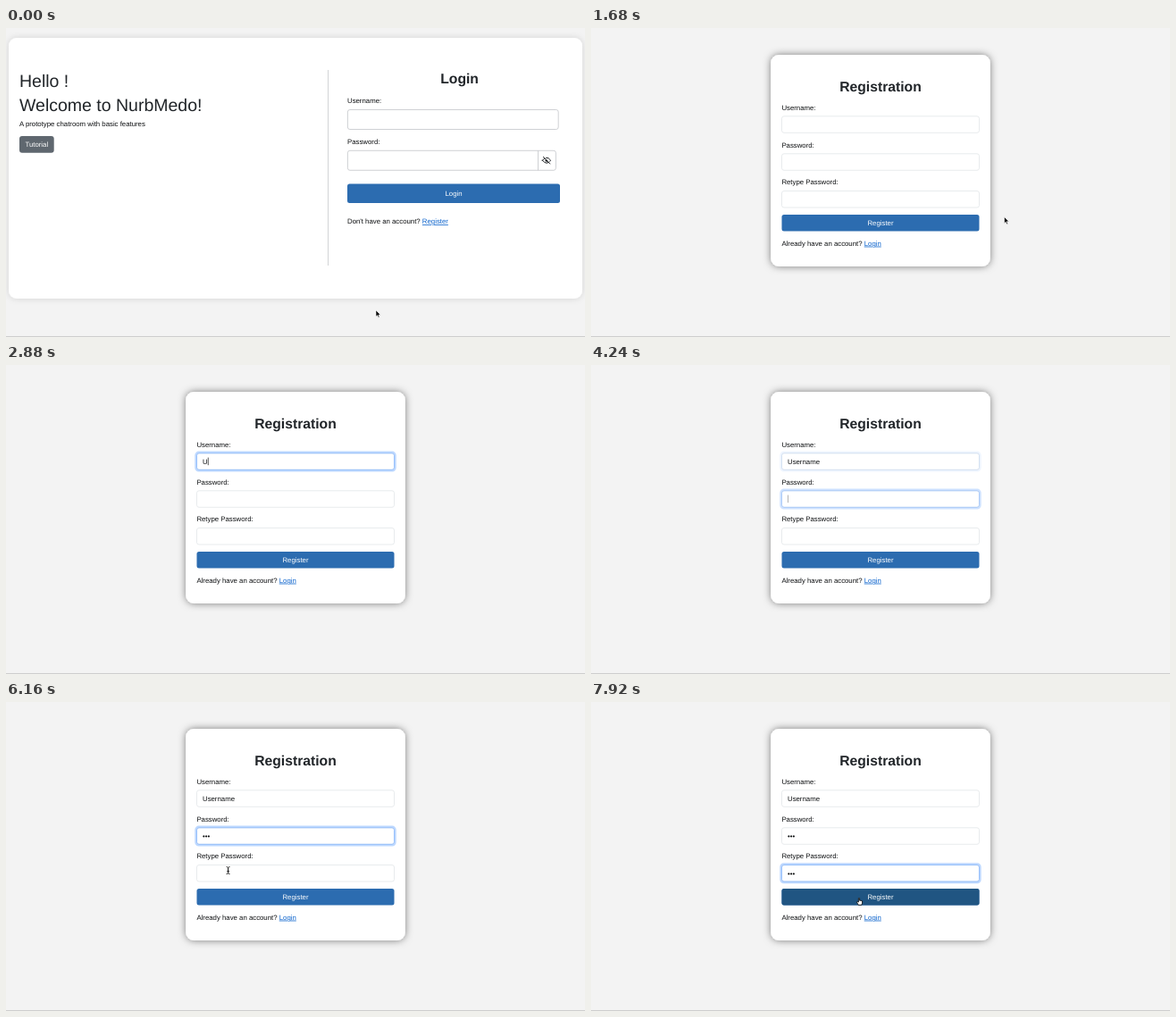
These frames come from a looping animation (648 by 346 pixels, 8 s). An HTML page:

```html
<!DOCTYPE html>
<html lang="en">
<head>
<meta charset="utf-8">
<title>Sign-up demo</title>
<style>
  html, body { margin: 0; width: 100%; height: 100%; overflow: hidden; background: #f3f3f3; }
  svg { display: block; width: 648px; height: 346px; }
  text {
    font: 7.8px "Liberation Sans", Arial, sans-serif;
    fill: #0c0e10; text-rendering: geometricPrecision; white-space: pre;
  }
  .big { font-size: 19.5px; fill: #212529; }
  .title { font-size: 15.7px; font-weight: bold; fill: #212529; text-anchor: middle; }
  .label { fill: #fff; text-anchor: middle; }
  .link { fill: #0a62cc; text-decoration: underline; }
  .option { font: 500 6.3px Inter, sans-serif; fill: #f4f4f4; }
  .status { font-size: 6.5px; fill: #555; }
</style>
</head>
<body>
<svg id="stage" viewBox="0 0 648 346"></svg>
<script>
const LOOP = 8000;
const TRANSITION = 150;
const FOCUS = { user: 2260, pass: 4140, retype: 6380 };

const text = (x, y, content, cls = "") => `<text x="${x}" y="${y}" class="${cls}">${content}</text>`;
const box = (x, y, w, h, r, attrs) =>
  `<rect x="${x}" y="${y}" width="${w}" height="${h}" rx="${r}" ${attrs}/>`;
const link = (id, label) => `<tspan id="${id}" class="link">${label}</tspan>`;

// Each button has a dark layer that fades in on hover.
const button = (id, x, y, w, h, label, baseline) =>
  box(x, y, w, h, 2.5, 'fill="#2c6cb0"') +
  box(x, y, w, h, 2.5, `id="${id}" fill="#205582" opacity="0"`) +
  text(x + w / 2, baseline, label, "label");

const field = (id, y) => `
  ${box(213.5, y, 221, 18.5, 2.5, 'fill="#fff" stroke="#dee2e6" stroke-width=".7"')}
  <g id="${id}Ring" fill="none">
    ${box(212.3, y - 1.2, 223.4, 20.9, 3.5, 'stroke="#0d6efd" stroke-opacity=".27" stroke-width="2"')}
    ${box(213.5, y, 221, 18.5, 2.5, 'stroke="#86b7fe" stroke-width=".8"')}
  </g>
  <text id="${id}Text" x="220" y="${y + 12}"></text>
  <rect id="${id}Caret" y="${y + 4.8}" width=".7" height="8.6" fill="#111"/>`;

const options = ["40718365", "k", "demo", "Marvolin", "Zem", "marvolin"];

const eyeSlash = `
  <g transform="translate(605 148.2)" fill="none" stroke="#1c1f22" stroke-linecap="round">
    <path d="M-4.6 0Q0-6.2 4.6 0Q0 6.2-4.6 0Z" stroke-width="1"/>
    <circle r="1.5" fill="#1c1f22" stroke="none"/>
    <path d="M-3-4.4L4.4 3" stroke="#fff" stroke-width="1"/>
    <path d="M-3.6-3.8L3.8 3.8" stroke-width="1"/>
  </g>`;

const loginPage = `
  <g id="loginPage">
    ${box(3, 11, 642, 292, 9, 'fill="#fff" filter="url(#softShadow)"')}
    ${text(15, 66, "Hello !", "big")}
    ${text(15, 93, "Welcome to NurbMedo!", "big")}
    ${text(15, 110, "A prototype chatroom with basic features")}
    ${box(15, 121, 38.7, 18.7, 3, 'fill="#5f676f"')}
    ${text(34.3, 133, "Tutorial", "label")}
    <path d="M360.5 47V266" stroke="#d2d4d6"/>
    ${text(507.6, 62, "Login", "title")}
    ${text(382, 83.7, "Username:")}
    ${box(382.4, 91.5, 235.8, 22, 2.5, 'fill="#fff" stroke="#c3c6c9" stroke-width=".8"')}
    ${text(382, 129.5, "Password:")}
    ${box(382.4, 137.3, 233, 22, 2.5, 'fill="#fff" stroke="#c3c6c9" stroke-width=".8"')}
    <path d="M595.5 137.3V159.3" stroke="#c3c6c9" stroke-width=".8"/>
    ${eyeSlash}
    ${button("loginHover", 382, 174.5, 238, 21.5, "Login", 187.7)}
    ${text(382, 219.2, `Don't have an account? ${link("registerLink", "Register")}`)}
    <g id="status">
      ${box(-3, 336.5, 46.7, 12, 1.5, 'fill="#cfcfcf" stroke="#8c8c8c" stroke-width=".8"')}
      ${text(0, 343.7, ":7300/register", "status")}
    </g>
  </g>`;

const registerPage = `
  <g id="registerPage">
    ${box(201.2, 30, 245.6, 237, 9, 'fill="#fff" filter="url(#deepShadow)"')}
    ${text(324, 71, "Registration", "title")}
    ${text(213.4, 91.6, "Username:")}
    ${field("user", 98.8)}
    ${text(213.4, 133.5, "Password:")}
    ${field("pass", 140.8)}
    ${text(213.4, 175.3, "Retype Password:")}
    ${field("retype", 182.5)}
    ${button("registerHover", 213.5, 209, 221, 18.4, "Register", 220.7)}
    ${text(213.4, 243.6, `Already have an account? ${link("loginLink", "Login")}`)}
    <g id="dropdown">
      <g fill="#1c1c1c" filter="url(#softShadow)">
        <path d="M266.5 122.5L271.7 118.3L277 122.5Z"/>
        ${box(262, 122, 75.8, 109.4, 3.5, 'stroke="#3c3c3c" stroke-width=".5"')}
      </g>
      ${options.map((name, i) => text(267.5, 135.4 + i * 17.55, name, "option")).join("")}
    </g>
  </g>`;

const cursors = `
  <g id="arrow"><path d="M0 0V7.2L1.7 5.7L2.8 8.2L4 7.7L2.9 5.2H5.2Z" fill="#000" stroke="#fff" stroke-width=".6"/></g>
  <g id="beam" fill="none" stroke-linecap="round">
    <path id="beamShape" d="M-1.6-4Q0-4 0-3V3Q0 4-1.6 4M1.6-4Q0-4 0-3V3Q0 4 1.6 4M-.9.9H.9" stroke="#111" stroke-width=".8"/>
  </g>
  <g id="hand">
    <path d="M-.6.2Q0-.7.6.2V2.8Q2.2 2.5 3.6 3.4Q3.9 6 2.8 7.8H-.8Q-1.6 6-2.5 4.4Q-1.7 3.4-.6 4.6Z"
      fill="#fff" stroke="#000" stroke-width=".8" stroke-linejoin="round"/>
  </g>`;

const stage = document.getElementById("stage");
stage.innerHTML = `
  <defs>
    <filter id="softShadow" x="-20%" y="-20%" width="140%" height="140%">
      <feDropShadow dx="0" dy="0" stdDeviation="3.5" flood-opacity=".14"/>
    </filter>
    <filter id="deepShadow" x="-20%" y="-20%" width="140%" height="140%">
      <feDropShadow dx="0" dy="0" stdDeviation="4.5" flood-opacity=".5"/>
    </filter>
  </defs>
  <rect width="648" height="346" fill="#f3f3f3"/>
  <path d="M0 345.5H648" stroke="#cdcdcd"/>
  ${loginPage}${registerPage}${cursors}`;

const el = {};
stage.querySelectorAll("[id]").forEach(node => { el[node.id] = node; });

const show = (node, visible) => node.setAttribute("display", visible ? "inline" : "none");
const setOpacity = (node, value) => node.setAttribute("opacity", value);
const smooth = p => { p = Math.max(0, Math.min(1, p)); return p * p * (3 - 2 * p); };
const fade = (t, start, end = Infinity) =>
  smooth((t - start) / TRANSITION) - smooth((t - end) / TRANSITION);
const within = (t, start, end) => t >= start && t < end;

// Pointer stops: time, x, y.
const stops = [
  [40, 414, 316], [640, 488, 186], [760, 488, 186], [1340, 480, 219.5],
  [1580, 478, 219.5], [2200, 260, 107], [5790, 260, 107], [6150, 248.6, 188.6],
  [7390, 248.6, 188.6], [7920, 300, 219.5]
];

function pointerAt(t) {
  const next = stops.findIndex(stop => stop[0] > t);
  if (next === 0) return stops[0].slice(1);
  if (next < 0) return stops[stops.length - 1].slice(1);
  const [t0, x0, y0] = stops[next - 1], [t1, x1, y1] = stops[next];
  const p = smooth((t - t0) / (t1 - t0));
  return [x0 + (x1 - x0) * p, y0 + (y1 - y0) * p];
}

function pointerShape(x, y, onLogin) {
  const inside = (left, top, right, bottom) => x > left && x < right && y > top && y < bottom;
  if (onLogin) return inside(382, 174, 620, 196) ? "hand" : "arrow";
  if (inside(213, 209, 435, 228)) return "hand";
  return [98, 140, 182].some(top => inside(213, top, 435, top + 19)) ? "beam" : "arrow";
}

const inputs = [
  { id: "user", value: "Username", keys: [2800, 2960, 3120, 3200, 3360, 3520, 3600, 3920],
    focus: FOCUS.user, blur: FOCUS.pass },
  { id: "pass", value: "•••", keys: [5120, 5200, 5360], focus: FOCUS.pass, blur: FOCUS.retype },
  { id: "retype", value: "•••", keys: [6880, 7040, 7200], focus: FOCUS.retype, blur: Infinity }
];

function drawInput({ id, value, keys, focus, blur }, t) {
  const typed = keys.filter(key => key <= t).length;
  const label = el[id + "Text"], caret = el[id + "Caret"];
  label.textContent = value.slice(0, typed);
  setOpacity(el[id + "Ring"], fade(t, focus, blur));
  const since = t - (typed ? keys[typed - 1] : focus);
  show(caret, within(t, focus, blur) && since % 1000 < 500);
  caret.setAttribute("x", 220.2 + (typed ? label.getComputedTextLength() : 0));
  setOpacity(caret, t - focus < TRANSITION ? 0.45 : 1);
}

function draw(t) {
  const onLogin = t < 1520;
  show(el.loginPage, onLogin);
  show(el.registerPage, !onLogin);

  const onLink = within(t, 1170, 1520);
  el.registerLink.style.textDecoration = onLink ? "none" : "underline";
  el.registerLink.style.fill = onLink ? "#0a58ca" : "";
  show(el.status, within(t, 1200, 1520));
  setOpacity(el.loginHover, fade(t, 500, 970));
  setOpacity(el.registerHover, fade(t, 7700));
  show(el.dropdown, within(t, 2300, 2800));
  inputs.forEach(input => drawInput(input, t));

  const [x, y] = pointerAt(t);
  const shape = pointerShape(x, y, onLogin);
  const hidden = within(t, 2800, 5800) || within(t, 6880, 7400);
  for (const name of ["arrow", "beam", "hand"]) {
    show(el[name], !hidden && name === shape);
    el[name].setAttribute("transform", `translate(${x} ${y})`);
  }
}

const start = performance.now();
function tick() {
  draw((performance.now() - start) % LOOP);
  requestAnimationFrame(tick);
}
tick();
</script>
</body>
</html>
```
